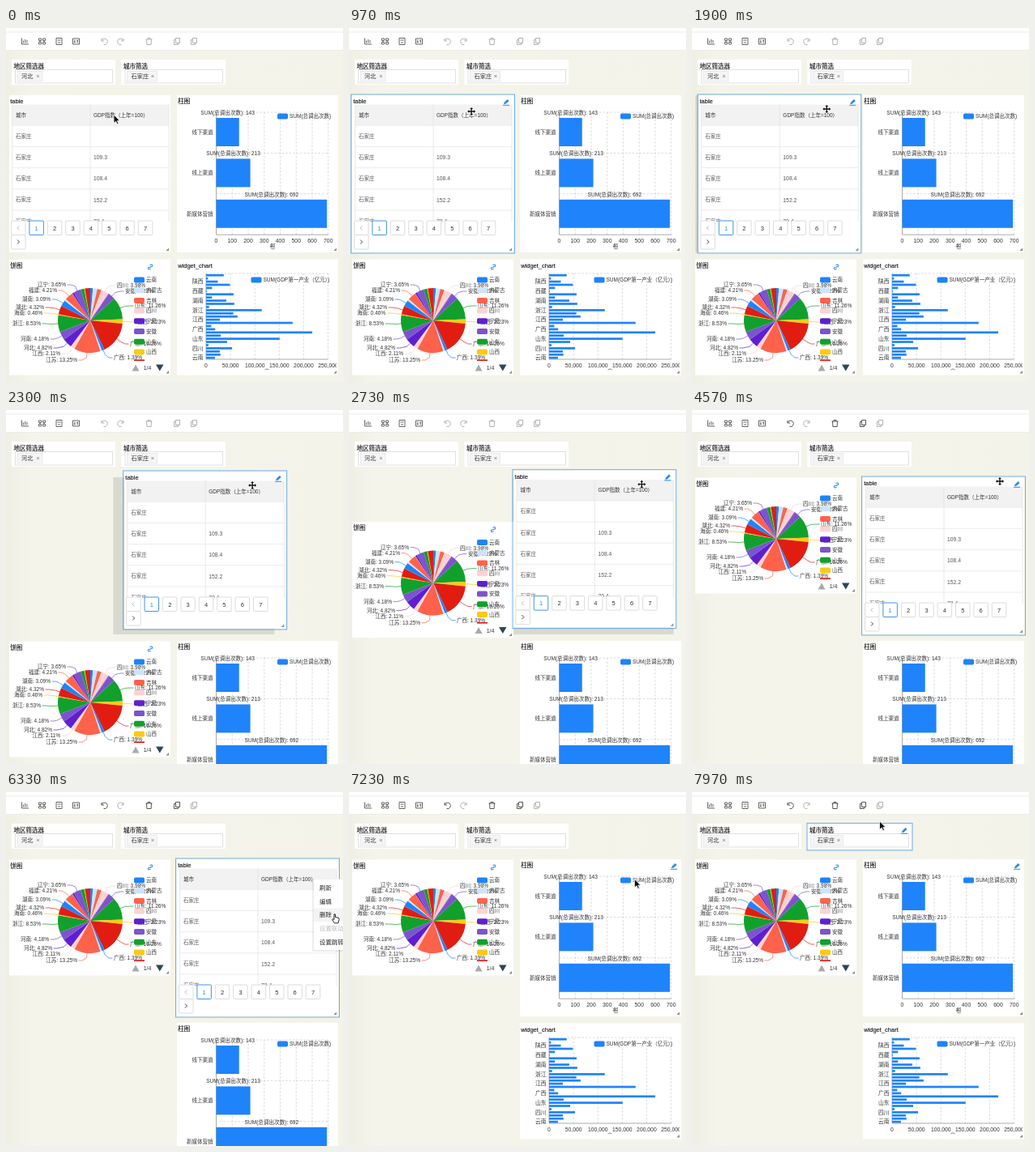
These frames come from a looping animation (416 by 437 pixels, 8 s). An HTML page:

```html
<!DOCTYPE html>
<html lang="zh">
<head>
<meta charset="utf-8">
<style>
html, body { margin: 0; width: 100%; height: 100%; overflow: hidden; background: #f4f4ea; }
svg { display: block; width: 416px; height: 437px; }
text { font-family: "Liberation Sans", "Noto Sans CJK SC", "Noto Sans CJK", sans-serif; white-space: pre; }
</style>
</head>
<body>
<svg id="stage" viewBox="0 0 416 437" xmlns="http://www.w3.org/2000/svg"></svg>
<script>
const LOOP = 8000, COL = 34.5, ROW = 202, GRAB = 162;
const BLUE = '#1f83fb', LINK = '#2b8ae6', INK = '#333';
const PALETTE = [BLUE, '#cfe3f8', '#ff624b', '#fbd3d3', '#5f1fd0', '#7c54cc', '#12a02c', '#fcc916', '#e11d12'];

// Province, share in percent, and for labelled slices the text anchor x and y
const PROVINCES = [
  ['云南', 1.36], ['内蒙古', 2.2], ['吉林', 2.1], ['四川', 3.98, 137, 318], ['宁夏', .37],
  ['安徽', 3.23, 147, 325], ['山东', 11.26, 159, 343], ['山西', 2.23, 162, 363],
  ['广东', 16.26, 153, 390], ['广西', 1.39, 133, 407], ['新疆', .8], ['江苏', 13.25, 88, 410],
  ['江西', 2.11, 67, 402], ['河北', 4.82, 57, 395], ['河南', 4.18, 53, 384], ['浙江', 8.53, 43, 365],
  ['海南', .46, 45, 352], ['湖北', 4.32, 47, 345], ['湖南', 3.09, 55, 335], ['甘肃', .9],
  ['福建', 4.21, 63, 324], ['西藏', .1], ['贵州', .9], ['辽宁', 3.65, 74, 317],
  ['重庆', 1.8], ['青海', .3], ['陕西', 2.7]
];

// SVG string helpers; text is placed by its vertical centre
const text = (x, y, s, size = 6.5, fill = INK, anchor = 'start', extra = '') =>
  `<text x="${x}" y="${y + size * .36}" font-size="${size}" fill="${fill}" text-anchor="${anchor}" ${extra}>${s}</text>`;
const rect = (x, y, w, h, fill, extra = '') =>
  `<rect x="${x}" y="${y}" width="${w}" height="${h}" fill="${fill}" ${extra}/>`;
const path = (d, stroke = INK, width = 1, fill = 'none', extra = '') =>
  `<path d="${d}" stroke="${stroke}" stroke-width="${width}" fill="${fill}" ${extra}/>`;
const group = (id, body, extra = '') => `<g id="${id}" ${extra}>${body}</g>`;
const range = (n, f) => Array.from({ length: n }, (_, i) => f(i)).join('');

const title = (x, y, s) => text(x, y, s, 7.5, '#111', 'start', 'stroke="#111" stroke-width=".12"');
const corner = (x, y) => path(`M${x - 3.5} ${y}h3.5v-3.5z`, 'none', 0, '#888');
const panel = (x, y, w, h, name) =>
  rect(x, y, w, h, '#fff') + title(x + 1.2, y + 7.5, name) + corner(x + w - 2, y + h - 2);
const pencil = (id, x, y) => group(id,
  path('M-3 2.6L-2.5 .5L1.6 -3.6L3.6 -1.6L-.6 2.3Z', 'none', 0, LINK) + path('M-4 3.8h8', LINK, 1),
  `transform="translate(${x} ${y})"`);

function toolbar() {
  const at = (x, d, id = '', color = '#555') =>
    path(d, color, .9, 'none', `transform="translate(${x} 16.5)" ${id && `id="${id}"`}`);
  const pages = 'M-1.5 -4h5v6h-5zM-1.5 -2h-2v6h5v-2';
  return rect(0, 0, 416, 27, '#fff') + rect(0, 4.5, 416, 1, '#ececec') + rect(0, 27, 416, 1, '#ededE6') +
    at(23.5, 'M-4 -4v7.5h8.5M-2 2v-3M.2 2v-4.5M2.4 2v-3.5') +
    at(44.5, 'M-4 -3.5h3v2.5h-3zM1 -3.5h3v2.5h-3zM-4 1h3v2.5h-3zM1 1h3v2.5h-3zM-2.5 -1v2M2.5 -1v2') +
    at(65.5, 'M-3.5 -4h7v8h-7zM-2 -1.5h4M-1.5 1.5h3') +
    at(86.5, 'M-4 -3.5h8v7h-8zM-1.7 -2v4M1.7 -2v4M-2.6 .8h1.8M.8 -.8h1.8') +
    at(121.5, 'M-3.5 -3.5v3h3M-3.3 -.8A3.6 3.6 0 1 1 -1 3.8', 'undo', '#aaa') +
    at(141.5, 'M3.5 -3.5v3h-3M3.3 -.8A3.6 3.6 0 1 0 1 3.8', '', '#aaa') +
    at(176.5, 'M-4 -2.5h8M-1.5 -2.5v-1.5h3v1.5M-3 -2.5l.4 6.5h5.2l.4 -6.5', 'trash', '#aaa') +
    at(211, pages, 'copy', '#aaa') + at(232, pages, '', '#aaa');
}

function filter(x, w, name, value, tagWidth) {
  return rect(x, 39, w, 31, '#fff') + title(x + 2.5, 47, name) +
    rect(x + 4.5, 51.5, w - 8, 16.5, '#fff', 'stroke="#d9d9d9" stroke-width=".8"') +
    rect(x + 7, 53.5, tagWidth, 12.5, '#f5f5f5', 'stroke="#e3e3e3" stroke-width=".7"') +
    text(x + 12, 59.5, value, 7.2) +
    text(x + tagWidth + 1.5, 59.5, '×', 7.5, '#777', 'middle');
}

function table() {
  const values = ['', '109.3', '108.4', '152.2', '70.4'];
  const button = (i, y, label) => rect(6.5 + i * 22.4, y, 17.5, 17.5, '#fff',
    `stroke="${label === 1 ? LINK : '#d9d9d9'}" stroke-width=".9" rx="1"`) +
    (label ? text(15.3 + i * 22.4, y + 9, label, 7.5, label === 1 ? LINK : INK, 'middle') : '');
  return panel(4, 83, 199, 194, 'table') +
    '<clipPath id="rows"><rect x="4" y="94" width="199" height="145"/></clipPath><g clip-path="url(#rows)">' +
    rect(7.5, 94.5, 193.5, 25.5, '#f2f2f2') +
    path('M7.5 94.5v150M104 94.5v150M201 94.5v150', '#e4e4e4', .8) +
    range(5, i => path(`M7.5 ${120.2 + i * 26.2}h193.5`, '#e6e6e6', .8) +
      text(12, 133.5 + i * 26.2, '石家庄', 6.5, '#555') + text(108, 133.5 + i * 26.2, values[i], 6.8, '#555')) +
    text(12, 107.5, '城市') + text(108, 107.5, 'GDP指数（上年=100）') + '</g>' +
    range(8, i => button(i, 238, i)) + button(0, 255.5, '') +
    path('M16.3 244.5l-2.5 2.5l2.5 2.5', '#bbb') + path('M14 261.5l2.5 2.5l-2.5 2.5', '#444') +
    rect(2.5, 82, 202, 196, 'none', `id="outline" stroke="${LINK}" stroke-width="1" stroke-opacity=".65"`) +
    pencil('tablePencil', 194, 91.5);
}

function pie() {
  const cx = 104, cy = 361, r = 40;
  const total = PROVINCES.reduce((sum, p) => sum + p[1], 0);
  const point = (a, d) => `${cx + d * Math.sin(a)} ${cy - d * Math.cos(a)}`;
  let angle = 0, slices = '', labels = '';
  PROVINCES.forEach(([name, share, x, y], i) => {
    const color = PALETTE[i % 9], end = angle + share / total * 2 * Math.PI, mid = (angle + end) / 2;
    slices += path(`M${cx} ${cy}L${point(angle, r)}A${r} ${r} 0 0 1 ${point(end, r)}Z`, 'none', 0, color);
    if (x) {
      const right = x > cx, side = right ? -1 : 1;
      labels += path(`M${point(mid, r)}L${point(mid, r + 6)}L${x + side * 6} ${y}H${x + side * 1.5}`, color, .7) +
        text(x, y, `${name}: ${share}%`, 6.5, INK, right ? 'start' : 'end');
    }
    angle = end;
  });
  const legend = range(8, i => rect(158, 307.5 + i * 12.7, 13, 7, PALETTE[i], 'rx="1.8"') +
    text(173, 311 + i * 12.7, PROVINCES[i][0]));
  return panel(4, 285.5, 199, 143, '饼图') + slices + labels + legend +
    rect(158, 409.3, 13, 1.7, PALETTE[8]) +
    path('M155.5 423.5h9l-4.5 -8z', 'none', 0, '#aaa') + path('M185 415.5h9.5l-4.7 8z', 'none', 0, '#2f4554') +
    text(174.5, 419.5, '1/4', 7, INK, 'middle') +
    path('M-.6 .8L2 -1.8A1.5 1.5 0 0 0 0 -3.4L-1.5 -2M.8 -.8L-2 1.8A1.5 1.5 0 0 0 0 3.2L1.5 1.8',
      LINK, 1, 'none', 'transform="translate(178 295) rotate(25)"');
}

function barChart() {
  const x0 = 259.5, unit = .1975;
  const bars = [['线下渠道', 143], ['线上渠道', 213], ['新媒体营销', 692]];
  return panel(211, 83, 199, 194, '柱图') +
    range(8, k => path(`M${x0 + k * 100 * unit} 104V255`, k ? '#ccc' : '#888', .7, 'none', k ? 'stroke-dasharray="2.5 2"' : '') +
      text(x0 + k * 100 * unit, 262.5, k * 100, 6.8, INK, 'middle')) +
    range(3, i => path(`M${x0} ${104 + i * 50.4}H398`, '#ccc', .7, 'none', 'stroke-dasharray="2.5 2"')) +
    path(`M${x0} 255.2H398`, '#888', .7) +
    bars.map(([name, n], i) => {
      const y = 111 + i * 50.4;
      return rect(x0, y, n * unit, 35, BLUE) + text(255.5, y + 17.5, name, 6.5, INK, 'end') +
        text(x0 + n * unit / 2, y - 6.5, `SUM(总调出次数): ${n}`, 6.6, INK, 'middle');
    }).join('') +
    rect(335, 105.5, 13, 7, BLUE, 'rx="1.8"') + text(350, 109, 'SUM(总调出次数)') +
    text(0, 0, '(数', 6, INK, 'middle', 'transform="translate(328.5 269.5) rotate(-90)"');
}

function widgetChart() {
  const x0 = 247, step = 30.1, pitch = 3.92;
  return panel(211, 285.5, 199, 143, 'widget_chart') +
    '<clipPath id="plot"><rect x="211" y="285" width="197" height="143"/></clipPath><g clip-path="url(#plot)">' +
    range(6, k => path(`M${x0 + k * step} 303V409`, k ? '#ccc' : '#888', .7, 'none', k ? 'stroke-dasharray="2.5 2"' : '') +
      text(x0 + k * step, 416.5, (k * 50000).toLocaleString('en-US'), 6.8, INK, 'middle')) +
    path(`M${x0} 303H397.5`, '#ccc', .7, 'none', 'stroke-dasharray="2.5 2"') + path(`M${x0} 409H397.5`, '#888', .7) +
    PROVINCES.map(([, share], i) => rect(x0, 405.8 - i * pitch, share * 8.06, 2.7, BLUE)).join('') +
    range(9, k => text(243.5, 407 - k * 11.75, ['云南', '四川', '山东', '广西', '江西', '浙江', '湖南', '西藏', '陕西'][k], 6.8, INK, 'end')) +
    rect(302.5, 307.5, 13, 7, BLUE, 'rx="1.8"') + text(317.5, 311, 'SUM(GDP第一产业（亿元）)') +
    path('M319.5 422q2.5 -2.5 5 0', '#555', .7) + '</g>';
}

function menu() {
  return rect(378, 107, 44, 90, '#000', 'opacity=".07" rx="2"') + rect(380, 107.5, 44, 87.5, '#fff', 'rx="1.5"') +
    rect(380, 0, 40, 16.5, '#f3f3f3', 'id="menuRow"') +
    ['刷新', '编辑', '删除', '设置联动', '设置跳转'].map((s, i) =>
      text(387, 118.5 + i * 16.6, s, 7.4, i === 3 ? '#bbb' : '#222')).join('');
}

const cursors =
  path('M0 0V10.5L2.6 8.2L4.2 11.8L6 11L4.4 7.6H7.6Z', '#fff', .8, '#111', 'id="arrow"') +
  group('move', ['#fff', '#111'].map((c, i) =>
    path('M-3.8 0H3.8M0 -3.8V3.8', c, i ? 1.4 : 3) +
    path('M-5 0l2 -2v4zM5 0l-2 -2v4zM0 -5l-2 2h4zM0 5l-2 -2h4z', c, i ? 0 : 1.2, c)).join('')) +
  path('M-2 -5Q-1.2 -6 -.5 -5V-1.5L3 -.8Q4.5 -.4 4.2 1.5L3 5.8H-1.5L-4.4 1.5Q-4.4 0 -2 1.5Z', '#111', .9, '#fff', 'id="hand"');

stage.innerHTML =
  '<linearGradient id="bg"><stop offset="0" stop-color="#efefe4"/><stop offset=".08" stop-color="#f4f4eb"/><stop offset="1" stop-color="#f3f3e9"/></linearGradient>' +
  rect(0, 0, 416, 437, 'url(#bg)') + toolbar() +
  filter(7, 128, '地区筛选器', '河北', 31) + filter(142.5, 128.5, '城市筛选', '石家庄', 37) +
  group('filterHover', rect(142, 38.5, 130, 33.5, 'none', `stroke="${LINK}" stroke-width="1" stroke-opacity=".65"`) +
    pencil('', 262, 47.5)) +
  rect(4, 83, 199, 194, '#d9dacf', 'id="slot"') +
  group('pie', pie()) + group('bar', barChart() + pencil('barPencil', 401, 91.5)) + group('widget', widgetChart()) +
  group('table', table()) + group('menu', menu()) + group('cursor', cursors);

const $ = id => document.getElementById(id);
const show = (id, on) => $(id).setAttribute('visibility', on ? 'visible' : 'hidden');
const place = (id, x, y) => $(id).setAttribute('transform', `translate(${x} ${y})`);

const HOVER = 900, DRAG = 1800, DROP = 3850, MENU = 5300, REMOVE = 6750, FILTER = 7450;
const ROUTE = [
  [0, 133, 107], [500, 133, 107], [1200, 160, 101], [1800, 162, 100], [1900, 166, 100], [2000, 200, 98],
  [2200, 282, 94], [2300, 304, 93], [2550, 344, 92], [2800, 368, 91.5], [3850, 368, 91.5], [4400, 380, 88],
  [4650, 380, 88], [5000, 401, 92], [5400, 401, 93], [5800, 403, 126], [6200, 407, 156], [6800, 407, 156],
  [7200, 360, 112], [7600, 262, 55], [7900, 231.5, 36], [8000, 231.5, 36]
];

function cursorAt(t) {
  const i = ROUTE.findIndex(k => k[0] > t), [t0, x0, y0] = ROUTE[i - 1], [t1, x1, y1] = ROUTE[i];
  const p = (t - t0) / (t1 - t0);
  return [x0 + (x1 - x0) * p, y0 + (y1 - y0) * p];
}

// Grid items settle over 200 ms
const settle = (t, start) => 1 - (1 - Math.min(1, Math.max(0, (t - start) / 200))) ** 2;

// Times at which the dragged table snaps to each next grid column
const snaps = [1, 2, 3, 4, 5, 6].map(k => {
  let t = DRAG;
  while (cursorAt(t)[0] - GRAB < (k - .5) * COL) t += 5;
  return t;
});

function draw(t) {
  const [x, y] = cursorAt(t);
  const dragging = t >= DRAG && t < DROP, open = t >= MENU && t < REMOVE, present = t < REMOVE;

  if (dragging) place('table', x - GRAB, y - 100);
  else place('table', t < DRAG ? 0 : 206 + settle(t, DROP), t < DRAG ? 0 : -8.5 * (1 - settle(t, DROP)));
  show('table', present);
  show('outline', present && t >= HOVER);
  show('tablePencil', present && t >= HOVER && !open);
  show('slot', dragging);
  place('slot', snaps.reduce((sum, s) => sum + COL * settle(t, s), 0), 0);

  const pushed = ROW * (settle(t, snaps[0]) - settle(t, REMOVE + 50));
  place('bar', 0, pushed);
  place('widget', 0, pushed);
  place('pie', 0, -ROW * settle(t, snaps[5]));

  for (const id of ['undo', 'trash', 'copy']) $(id).setAttribute('stroke', t < DROP ? '#aaa' : '#444');
  show('barPencil', !present);
  show('filterHover', t >= FILTER);
  show('menu', open);
  const row = Math.floor((y - 110.2) / 16.6);
  show('menuRow', open && row >= 0);
  $('menuRow').setAttribute('y', 110.2 + row * 16.6);

  place('cursor', x, y);
  show('move', t >= HOVER && t < 4850);
  show('hand', t >= 4850 && t < REMOVE + 100);
  show('arrow', t < HOVER || t >= REMOVE + 100);
}

function frame(now) {
  draw(now % LOOP);
  requestAnimationFrame(frame);
}
draw(0);
requestAnimationFrame(frame);
</script>
</body>
</html>
```
